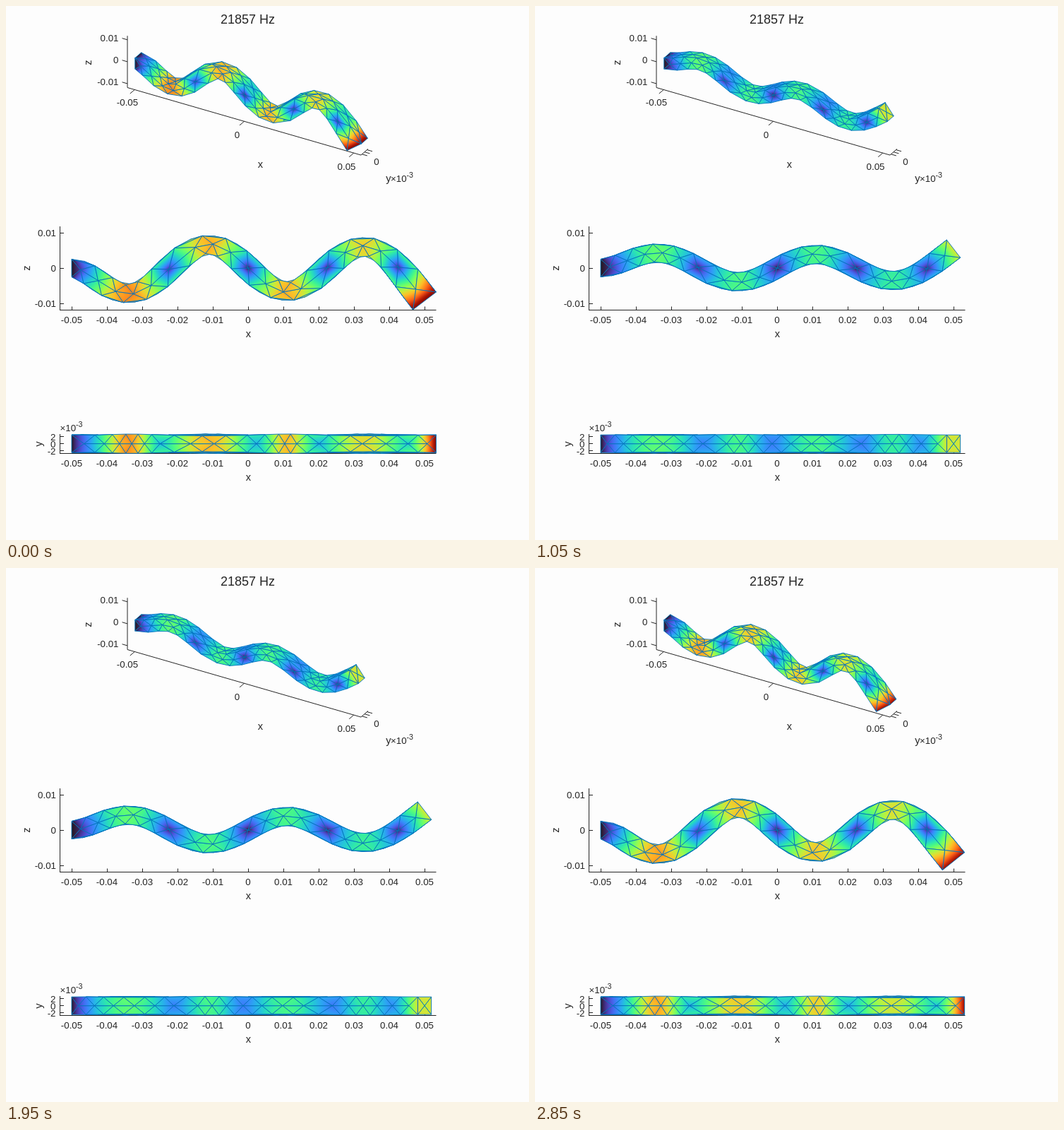
Write an HTML page with a canvas that moves like this. It is 741 px wide and 756 px high and loops after 3 s.

```html
<!DOCTYPE html>
<html lang="en">
<head>
<meta charset="utf-8">
<title>Beam mode</title>
<style>
html, body { margin: 0; width: 100%; height: 100%; overflow: hidden; background: #fdfdfd; }
svg, canvas { position: absolute; left: 0; top: 0; width: 741px; height: 756px; }
text { font-family: "Liberation Sans", Arial, sans-serif; fill: #262626; }
line { stroke: #262626; stroke-width: 1; }
</style>
</head>
<body>
<svg id="axes" viewBox="0 0 741 756"></svg>
<canvas id="beam" width="741" height="756"></canvas>
<script>
(() => {
const STEP = 150, STEPS = 20;
const LEN = 500, HALF = 12.5, TIP = 46.5, NU = 0.3;
const EDGE = "#0072bd";

// Lengths are in units of 0.2 mm, measured from the beam's centre.
function makeView(az, el, scale, cx, cy) {
  const r = Math.PI / 180;
  const ca = Math.cos(az * r), sa = Math.sin(az * r);
  const ce = Math.cos(el * r), se = Math.sin(el * r);
  return ([x, y, z]) => [
    cx + scale * (ca * x + sa * y),
    cy - scale * (-sa * se * x + ca * se * y + ce * z),
    sa * ce * x - ca * ce * y + se * z
  ];
}
const iso = makeView(30, 30, 0.717, 342.5, 122.3);
const side = makeView(0, 0, 1, 343, 371);
const plan = makeView(0, 90, 1, 343, 619.7);

/* ---------- axes ---------- */
const svg = document.getElementById("axes");

function add(tag, attrs, content = "") {
  const el = document.createElementNS("http://www.w3.org/2000/svg", tag);
  for (const k in attrs) el.setAttribute(k, attrs[k]);
  el.textContent = content;
  svg.append(el);
}
const line = (x1, y1, x2, y2) => add("line", { x1, y1, x2, y2 });
const text = (s, x, y, anchor = "middle", size = 13.3) =>
  add("text", { x, y, "text-anchor": anchor, "font-size": size }, s);
const label = (s, x, y) => text(s, x, y, "middle", 14.6);
const upright = (s, x, y) => add("text", {
  transform: `translate(${x} ${y}) rotate(-90)`, "text-anchor": "middle", "font-size": 14.6
}, s);
function power(x, y) {
  text("×10", x, y, "start");
  text("-3", x + 22.5, y - 6, "start", 10.7);
}

text("21857 Hz", 342.5, 24.5, "middle", 18);

function xAxis(y) {
  line(76, y, 609.5, y);
  for (let i = -5; i <= 5; i++) {
    const x = 343 + i * 50;
    line(x + 0.5, y, x + 0.5, y - 5);
    text(i ? String(i / 100) : "0", x, y + 18.7);
  }
  label("x", 343.5, y + 38);
}
xAxis(430.5);
line(76.5, 312, 76.5, 430);
for (const [s, y] of [["0.01", 321], ["0", 371], ["-0.01", 421]]) {
  line(76, y + 0.5, 82, y + 0.5);
  text(s, 71, y + 4.7, "end");
}
upright("z", 34, 371);

xAxis(633.5);
line(76.5, 606, 76.5, 634);
for (const v of [2, 0, -2]) {
  const y = 620 - v * 5;
  line(76, y - 0.5, 82, y - 0.5);
  text(String(v), 70.5, y + 4.5, "end");
}
upright("y", 51, 620);
power(76.5, 601.8);

const XL = 266.5, YL = 14, ZL = 59;
function segment(a, b) {
  const p = iso(a), q = iso(b);
  line(p[0], p[1], q[0], q[1]);
}
segment([-XL, -YL, ZL], [-XL, -YL, -ZL]);
segment([-XL, -YL, -ZL], [XL, -YL, -ZL]);
segment([XL, -YL, -ZL], [XL, YL, -ZL]);
for (const v of [-1, 0, 1]) {
  segment([-XL, -YL, v * 50], [-XL - 12, -YL, v * 50]);
  segment([v * 250, -YL, -ZL], [v * 250, -YL - 18, -ZL]);
  segment([XL, v * 10, -ZL], [XL + 12, v * 10, -ZL]);
}
text("0.01", 159.5, 49.5, "end");
text("0", 159.5, 80.5, "end");
text("-0.01", 159.5, 112, "end");
text("-0.05", 172, 141);
text("0", 327.5, 186.5);
text("0.05", 482.5, 231.5);
text("0", 525, 224.5);
label("x", 360.5, 228.5);
upright("z", 120.5, 80);
label("y", 542, 249);
power(545, 249);

/* ---------- mesh ---------- */
const mids = [];
for (let i = 0; i < 6; i++) mids.push(-237.5 + 25 * i);
for (let i = -3; i <= 3; i++) mids.push(25 * i);
for (let i = 0; i < 6; i++) mids.push(112.5 + 25 * i);
const rims = [-250];
for (let i = 1; i < mids.length; i++) rims.push((mids[i - 1] + mids[i]) / 2);
rims.push(250);

const verts = [], tris = [], lookup = new Map();

function vert(p) {
  const key = p.join();
  if (!lookup.has(key)) lookup.set(key, verts.push(p) - 1);
  return lookup.get(key);
}
// Adds a triangle wound anticlockwise as seen from outside, along normal n
function tri(n, a, b, c) {
  const u = b.map((v, i) => v - a[i]), w = c.map((v, i) => v - a[i]);
  const dot = n[0] * (u[1] * w[2] - u[2] * w[1])
            + n[1] * (u[2] * w[0] - u[0] * w[2])
            + n[2] * (u[0] * w[1] - u[1] * w[0]);
  tris.push((dot > 0 ? [a, b, c] : [a, c, b]).map(vert));
}
// place(x, s) puts a point on a long face; s runs from -1 to 1 across it
function longFace(n, place) {
  const last = mids.length - 1;
  mids.forEach((m, i) => {
    for (const s of [-1, 1]) {
      tri(n, place(rims[i], s), place(rims[i + 1], s), place(m, 0));
      if (i < last) tri(n, place(m, 0), place(mids[i + 1], 0), place(rims[i + 1], s));
    }
  });
  tri(n, place(-250, -1), place(-250, 1), place(mids[0], 0));
  tri(n, place(250, -1), place(250, 1), place(mids[last], 0));
}
for (const d of [-1, 1]) {
  longFace([0, d, 0], (x, s) => [x, d * HALF, s * HALF]);
  longFace([0, 0, d], (x, s) => [x, s * HALF, d * HALF]);
  const corner = [[-1, -1], [1, -1], [1, 1], [-1, 1]].map(([y, z]) => [d * 250, y * HALF, z * HALF]);
  corner.forEach((c, i) => tri([d, 0, 0], c, corner[(i + 1) % 4], [d * 250, 0, 0]));
}

/* ---------- fifth cantilever bending mode ---------- */
const { sin, cos, sinh, cosh } = Math;
const B = 14.13716839;
const SIG = (cosh(B) + cos(B)) / (sinh(B) + sin(B));

function modeShape([x, y, z]) {
  const f = (x + 250) / LEN, q = B * f, k = B / LEN;
  const amp = -TIP / 2 * (1 + 0.05 * (1 - f));
  const w = amp * (cosh(q) - cos(q) - SIG * (sinh(q) - sin(q)));
  const slope = amp * k * (sinh(q) + sin(q) - SIG * (cosh(q) - cos(q)));
  const clamp = Math.min(1, f * 12);
  const curve = clamp * amp * k * k * (cosh(q) + cos(q) - SIG * (sinh(q) + sin(q)));
  return [-z * slope, NU * y * z * curve, w + NU / 2 * curve * (z * z - y * y)];
}
const shape = verts.map(modeShape);
const sizes = shape.map(d => Math.hypot(...d));
const peak = Math.max(...sizes);

/* ---------- drawing ---------- */
const ctx = document.getElementById("beam").getContext("2d");
ctx.lineJoin = "round";
ctx.lineWidth = 0.9;
ctx.strokeStyle = EDGE;

const poly = (c, v) => c.reduceRight((sum, k) => sum * v + k, 0);
const RED = [0.13572138, 4.6153926, -42.66032258, 132.13108234, -152.94239396, 59.28637943];
const GREEN = [0.09140261, 2.19418839, 4.84296658, -14.18503333, 4.27729857, 2.82956604];
const BLUE = [0.1066733, 12.64194608, -60.58204836, 110.36276771, -89.90310912, 27.34824973];
function turbo(v) {
  const rgb = [RED, GREEN, BLUE].map(c => Math.round(255 * Math.min(1, Math.max(0, poly(c, v)))));
  return `rgb(${rgb})`;
}

// The value is linear over a triangle, so a linear gradient shades it.
function shade(p, v, det) {
  const [a, b, c] = p;
  const lo = Math.min(...v), span = Math.max(...v) - lo;
  const db = v[1] - v[0], dc = v[2] - v[0];
  const gx = (db * (c[1] - a[1]) - dc * (b[1] - a[1])) / det;
  const gy = (dc * (b[0] - a[0]) - db * (c[0] - a[0])) / det;
  const g2 = gx * gx + gy * gy;
  if (span < 0.004 || g2 < 1e-10) return turbo(lo + span / 2);
  const [x, y] = p[v.indexOf(lo)], r = span / g2;
  const grad = ctx.createLinearGradient(x, y, x + gx * r, y + gy * r);
  const n = Math.ceil(span * 30) + 1;
  for (let i = 0; i <= n; i++) grad.addColorStop(i / n, turbo(lo + span * i / n));
  return grad;
}

function drawBeam(view, points, values) {
  const flat = points.map(view);
  const faces = [];
  for (const t of tris) {
    const p = t.map(i => flat[i]);
    const [a, b, c] = p;
    const det = (b[0] - a[0]) * (c[1] - a[1]) - (c[0] - a[0]) * (b[1] - a[1]);
    if (det < -0.01) faces.push({ p, det, v: t.map(i => values[i]), depth: a[2] + b[2] + c[2] });
  }
  faces.sort((f, g) => f.depth - g.depth);
  for (const { p, v, det } of faces) {
    ctx.beginPath();
    for (const [x, y] of p) ctx.lineTo(x, y);
    ctx.closePath();
    ctx.fillStyle = shade(p, v, det);
    ctx.fill();
    ctx.stroke();
  }
}

function draw(step) {
  const a = cos(2 * Math.PI * step / STEPS);
  const points = verts.map((p, i) => p.map((c, j) => c + a * shape[i][j]));
  const values = sizes.map(s => Math.abs(a) * s / peak);
  ctx.clearRect(0, 0, 741, 756);
  for (const view of [iso, side, plan]) drawBeam(view, points, values);
}

let shown = -1;
const start = performance.now();
function tick() {
  const step = Math.floor((performance.now() - start) / STEP) % STEPS;
  if (step !== shown) draw(shown = step);
  requestAnimationFrame(tick);
}
tick();
})();
</script>
</body>
</html>
```
